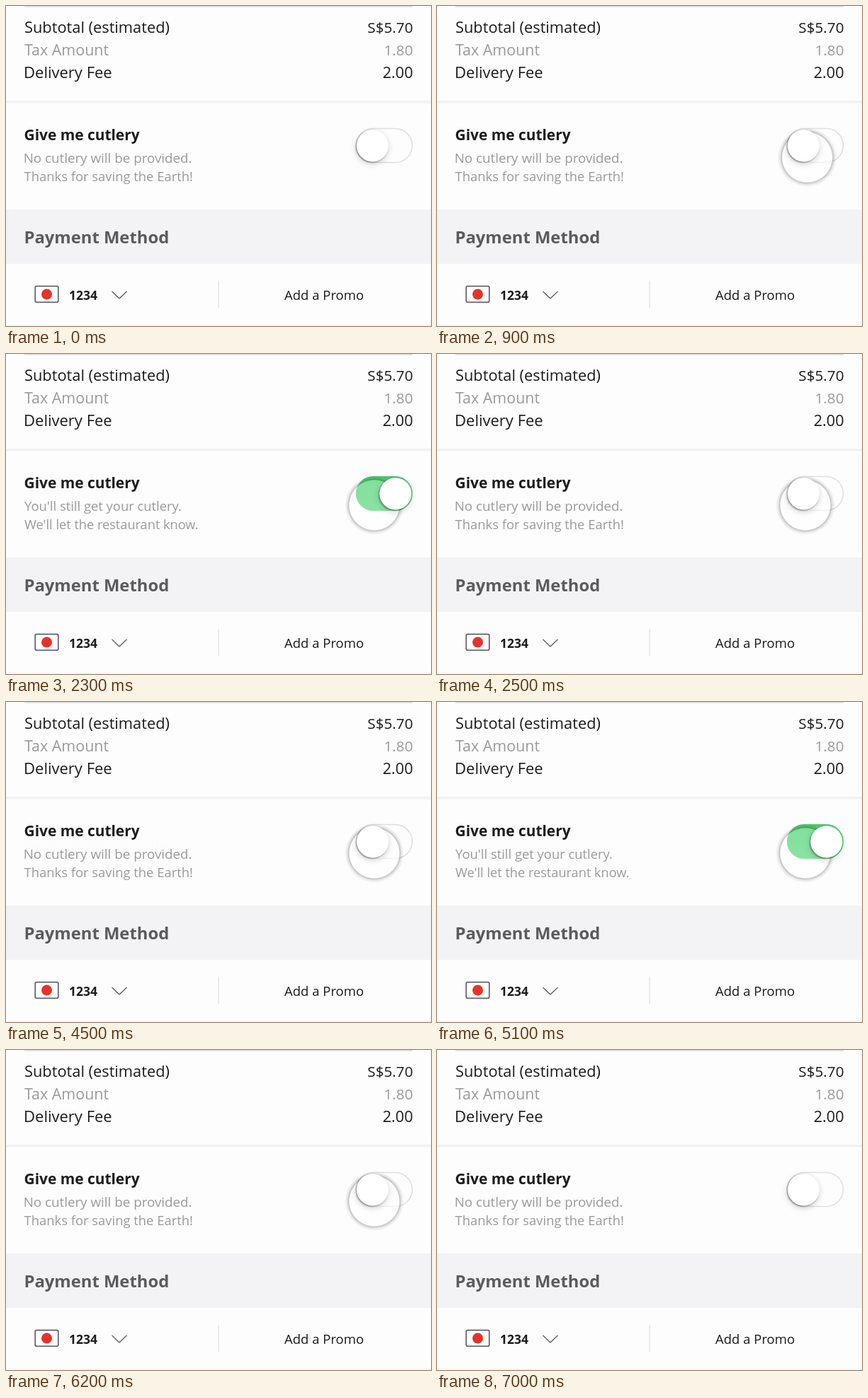
These frames come from a looping animation (600x453 px, 8.7 s). An HTML page:

```html
<!DOCTYPE html>
<html lang="en">
<head>
<meta charset="utf-8">
<title>Cutlery toggle</title>
<style>
  html, body { margin: 0; width: 100%; height: 100%; overflow: hidden; background: #fefdfe; }
  svg { display: block; width: 600px; height: 453px; font-family: "Open Sans", "Noto Sans", sans-serif; fill: #1b1b1d; }
  .grey { fill: #9a9a9c; }
  .bold { font-weight: 700; }
  .end { text-anchor: end; }
  #knob { filter: drop-shadow(-.5px 1px 1px rgba(0,0,0,.42)) drop-shadow(0 3px 4px rgba(0,0,0,.16)); }
</style>
</head>
<body>
<svg viewBox="0 0 600 453">
  <defs>
    <radialGradient id="halo" gradientUnits="userSpaceOnUse" cx="0" cy="0" r="42">
      <stop offset=".83" stop-color="#000" stop-opacity="0"/>
      <stop offset=".86" stop-color="#000" stop-opacity=".22"/>
      <stop offset=".92" stop-color="#000" stop-opacity=".08"/>
      <stop offset="1" stop-color="#000" stop-opacity="0"/>
    </radialGradient>
    <linearGradient id="green" x2="0" y2="1">
      <stop offset="0" stop-color="#4cc76b"/>
      <stop offset=".2" stop-color="#5ad67c"/>
      <stop offset="1" stop-color="#62d983"/>
    </linearGradient>
  </defs>

  <rect width="600" height="453" fill="#fefdfe"/>
  <rect x="26" width="548" height="1.5" fill="#dcdbdd"/>
  <rect y="134" width="600" height="3.5" fill="#f2f1f3"/>
  <rect y="288" width="600" height="77" fill="#f3f2f4"/>
  <rect y="451" width="600" height="2" fill="#f7f6f7"/>
  <rect x="299.5" y="389" width="1.2" height="38" fill="#dfdee0"/>

  <g font-size="21.8">
    <text x="26" y="38">Subtotal (estimated)</text>
    <text x="26" y="70" class="grey" font-size="21.4">Tax Amount</text>
    <text x="25" y="102" font-size="22">Delivery Fee</text>
  </g>
  <g font-size="20.700" class="end">
    <text x="574.500" y="38">S$5.70</text>
    <text x="574.500" y="70" class="grey">1.80</text>
    <text x="574.500" y="102" font-size="21.6">2.00</text>
  </g>

  <text x="25.500" y="190" class="bold" font-size="20.9">Give me cutlery</text>
  <g id="offNote" class="grey">
    <text x="24.700" y="222" font-size="18.800">No cutlery will be provided.</text>
    <text x="25.500" y="248" font-size="18.400">Thanks for saving the Earth!</text>
  </g>
  <g id="onNote" class="grey">
    <text x="26" y="222" font-size="18.400">You'll still get your cutlery.</text>
    <text x="26" y="248" font-size="18.200">We'll let the restaurant know.</text>
  </g>

  <text x="25.500" y="335.500" class="bold" font-size="23.8" fill="#5b5a5d">Payment Method</text>
  <rect x="41.200" y="396.700" width="32.600" height="22.600" rx="2" fill="#fff" stroke="#626164" stroke-width="1.7"/>
  <circle cx="57.500" cy="408" r="7.500" fill="#e5322d"/>
  <text x="89" y="415.700" class="bold" font-size="17.500">1234</text>
  <path d="M149.500 404 160 414 170.500 404" fill="none" stroke="#5f5e61" stroke-width="1.3"/>
  <text x="393" y="416" font-size="18.500">Add a Promo</text>

  <rect x="494.500" y="173.500" width="79" height="48" rx="24" fill="#fefdfe" stroke="#dfdee0" stroke-width="1.5"/>
  <rect id="fill" x="494" y="173" width="80" height="49" rx="24.500" fill="url(#green)"/>
  <g id="pointer">
    <circle id="tip" r="36" fill="#fff"/>
    <circle cy="1" r="42" fill="url(#halo)"/>
  </g>
  <circle id="knob" cy="197.800" r="22.600" fill="#fff"/>
</svg>
<script>
const LOOP = 8700, STEP = 100;
const el = id => document.getElementById(id);
const set = (id, attrs) => {
  for (const key in attrs) el(id).setAttribute(key, attrs[key]);
};
const ramp = (t, start, length) => Math.min(1, Math.max(0, (t - start) / length));
const smooth = u => u * u * (3 - 2 * u);
const easeOut = u => 1 - (1 - u) ** 3;
const mix = (a, b, u) => a + (b - a) * u;

// Switch movements: start, length, direction
const taps = [[1380, 330, 1], [2300, 200, -1], [4480, 420, 1], [5780, 420, -1]];

function draw(time) {
  const t = Math.floor(time % LOOP / STEP) * STEP;
  const on = taps.reduce((sum, [start, length, dir]) => sum + dir * smooth(ramp(t, start, length)), 0);

  set('offNote', { opacity: 1 - on, transform: `translate(0 ${12 * on})` });
  set('onNote', { opacity: on, transform: `translate(0 ${12 * (on - 1)})` });
  set('fill', { opacity: Math.min(1, on * 1.35) });
  set('knob', { cx: mix(517.5, 549.8, on) });

  const arrive = easeOut(ramp(t, 640, 360));
  set('pointer', {
    opacity: t < 700 ? 0 : 1 - ramp(t, 6800, 200),
    transform: `translate(${mix(645, 520, arrive)} ${mix(225, 214, arrive)})`
  });
  set('tip', { opacity: mix(.6, .25, on) });
}

const begin = performance.now();
function tick() {
  draw(performance.now() - begin);
  requestAnimationFrame(tick);
}
tick();
</script>
</body>
</html>
```
